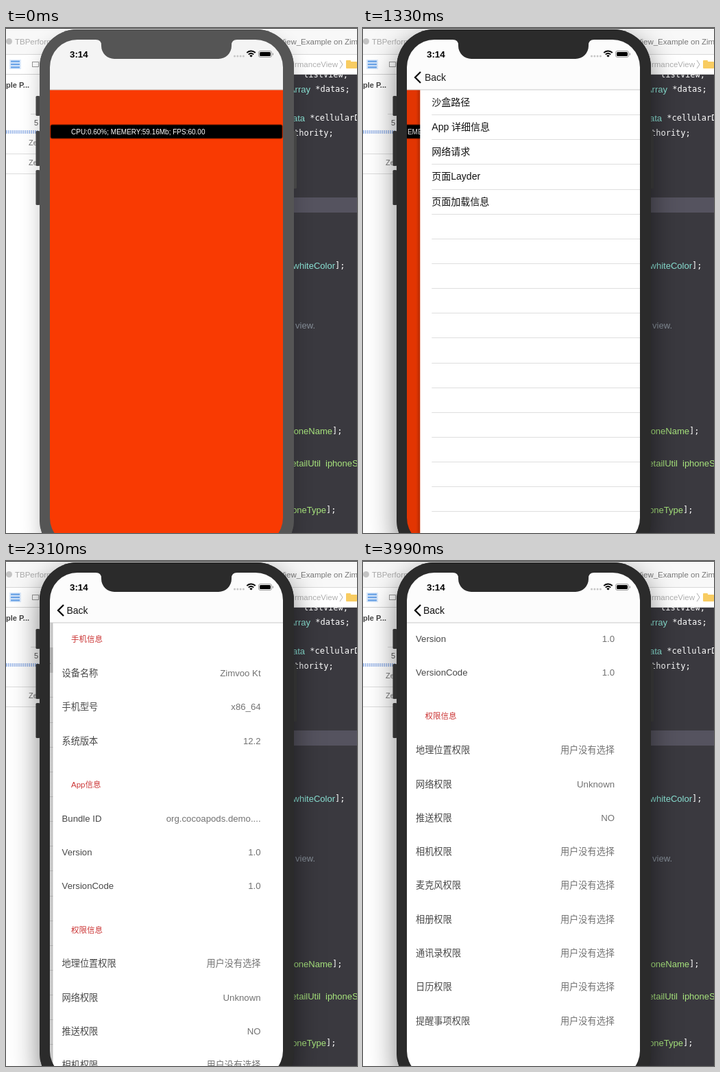
Write an HTML page with a canvas that moves like this. It is 512 px wide and 736 px high and loops after 4060 ms.

```html
<!DOCTYPE html>
<html lang="zh">
<head>
<meta charset="utf-8">
<style>
html, body { margin: 0; width: 100%; height: 100%; overflow: hidden; background: #fff; }
canvas { display: block; }
</style>
</head>
<body>
<canvas id="stage" width="512" height="736"></canvas>
<script>
const c = document.getElementById('stage').getContext('2d');
const SANS = '"Liberation Sans", "Noto Sans CJK SC", "Noto Sans CJK", sans-serif';
const MONO = '"DejaVu Sans Mono", monospace';
const LOOP = 4060, STEP = 70;
const LEFT = 64, TOP = 17, WIDTH = 340, NAV = 90, ROW = 36.14;
const TAP = 1050, PUSH_LIST = 1075, PUSH_INFO = 1960, SCROLL = 2520, SCROLL_END = 3290;

const MENU = ['沙盒路径', 'App 详细信息', '网络请求', '页面Layder', '页面加载信息'];
const ASK = '用户没有选择';
const INFO = [
  ['手机信息', [['设备名称', 'Zimvoo Kt'], ['手机型号', 'x86_64'], ['系统版本', '12.2']]],
  ['App信息', [['Bundle ID', 'org.cocoapods.demo....'], ['Version', '1.0'], ['VersionCode', '1.0']]],
  ['权限信息', [['地理位置权限', ASK], ['网络权限', 'Unknown'], ['推送权限', 'NO'], ['相机权限', ASK],
    ['麦克风权限', ASK], ['相册权限', ASK], ['通讯录权限', ASK], ['日历权限', ASK], ['提醒事项权限', ASK]]]
];

// y is the vertical middle of the glyphs
function text(s, x, y, size, color, { align = 'left', font = SANS, weight = '' } = {}) {
  c.font = `${weight} ${size}px ${font}`;
  c.textAlign = align;
  c.fillStyle = color;
  c.fillText(s, x, y + size * 0.36);
}

function rect(x, y, w, h, color, r = 0) {
  c.fillStyle = color;
  c.beginPath();
  c.roundRect(x, y, w, h, r);
  c.fill();
}

function clipped(x, y, w, h, r, draw) {
  c.save();
  c.beginPath();
  c.roundRect(x, y, w, h, r);
  c.clip();
  draw();
  c.restore();
}

// Share of a spring motion still to go, from 1 to 0
function left(t, start, rate) {
  const x = Math.max(0, t - start) / 1000 * rate;
  const rest = (1 + x) * Math.exp(-x);
  return rest < 0.003 ? 0 : rest;
}

// Coloured word ending at x, plain code following it
function code(word, x, y, color, rest = '') {
  text(word, x, y, 13, color, { align: 'right' });
  text(rest, x, y, 12, '#fff', { font: MONO });
}

function desktop(t) {
  rect(0, 0, 512, 736, '#fff');
  rect(0, 0, 512, 38, '#f8f8f8');
  rect(0, 0, 512, 1, '#333');
  rect(0, 38, 512, 1, '#d8d8d8');
  rect(0, 67, 512, 1, '#d2d2d2');
  rect(0, 15, 9, 9, '#c4c4c4', 4.5);
  text('TBPerformance', 13, 20, 11.5, '#aaa');
  rect(5, 46, 17, 14, '#dceafb');
  for (let i = 0; i < 3; i++) rect(7, 47.5 + i * 4.3, 13, 2.4, '#6da5e8');
  c.strokeStyle = '#999';
  c.strokeRect(38.5, 49.5, 9, 7);
  text('ple P...', 0, 83, 11, '#444', { weight: 'bold' });
  rect(36, 125, 10, 1, '#ddd');
  text('5', 41, 138, 11, '#555');
  for (let x = 0; x < 46; x += 3) rect(x, 149, 2, 5, '#a9c1ec');
  if (t < TAP || t > 2450) text('Zero', 33, 167, 11, '#777');
  text('Zero', 33, 196, 11, '#777');
  for (const y of [183, 212]) rect(0, y, 48, 1, '#ddd');

  text('View_Example on ', 494, 20, 11.5, '#777', { align: 'right' });
  text('Zim', 494, 20, 11.5, '#777');
  text('rmanceView', 484, 53, 11.5, '#b0b0b0', { align: 'right' });
  c.strokeStyle = '#aaa';
  c.beginPath();
  c.moveTo(487, 47); c.lineTo(491, 53); c.lineTo(487, 59);
  c.stroke();
  rect(496, 49, 16, 10, '#f8cc62', 1);
  rect(496, 47, 7, 4, '#f8cc62', 1);

  clipped(400, 68, 112, 668, 0, () => {
    rect(400, 68, 112, 668, '#3a393f');
    rect(400, 247, 112, 22, '#55535f');
    const teal = '#8be3d5', green = '#a8e57d';
    text('listView;', 434, 68, 12, '#fff', { font: MONO });
    code('NSArray', 444, 89, teal, ' *datas;');
    code('Data', 436, 131, teal, ' *cellularData;');
    text('thority;', 420, 153, 12, '#fff', { font: MONO });
    code('whiteColor', 480, 346, teal, '];');
    code('view.', 451, 433, '#87909a');
    code('phoneName', 476, 587, green, '];');
    code('DetailUtil', 459, 634, green);
    text('iphoneSize', 466, 634, 13, green);
    code('phoneType', 467, 702, green, '];');
  });
}

function phoneBody(active) {
  const color = active ? '#2b2b2b' : '#555';
  c.save();
  c.shadowColor = `rgba(0,0,0,${active ? 0.5 : 0.22})`;
  c.shadowBlur = active ? 40 : 28;
  c.shadowOffsetY = 14;
  rect(49, 2, 371, 770, color, 55);
  c.restore();
  for (const [x, y, h] of [[43.5, 99, 29], [43.5, 150, 51], [43.5, 207, 51], [418, 150, 84]])
    rect(x, y, 6, h, active ? '#303030' : '#444', 1.5);
  rect(49, 2, 371, 770, color, 55);
}

// Page sliding in from the right with a thin shadow on its edge
function page(x, rest, draw) {
  if (rest > 0) {
    const g = c.createLinearGradient(x - 6, 0, x, 0);
    g.addColorStop(0, 'rgba(0,0,0,0)');
    g.addColorStop(1, 'rgba(0,0,0,.2)');
    c.fillStyle = g;
    c.fillRect(x - 6, NAV, 6, 660);
  }
  rect(x, NAV, WIDTH, 660, '#fff');
  draw(x);
}

function dim(amount) {
  rect(LEFT, NAV, WIDTH, 660, `rgba(0,0,0,${amount})`);
}

function home(x, t) {
  rect(x, NAV, WIDTH, 660, '#f93a02');
  rect(x + 0.5, 140.5, 339, 21, '#6d1900', 3);
  rect(x + 1.5, 141.5, 337, 19, '#000', 2);
  text(`CPU:0.${t < 500 ? 6 : 4}0%; MEMERY:59.16Mb; FPS:60.00`, x + 31, 151, 10, '#fff');
}

function menu(x, t) {
  for (let i = 1; i < 18; i++) rect(x + 17, Math.round(NAV + i * ROW), WIDTH - 17, 1, '#dedede');
  if (t >= PUSH_INFO) rect(x, 126, WIDTH, 36, '#d9d9d9');
  MENU.forEach((s, i) => text(s, x + 17, 108 + i * ROW, 14, '#111'));
}

function info(x, scroll) {
  let y = 114 - scroll;
  for (const [title, rows] of INFO) {
    text(title, x + 26.5, y, 11.5, '#cb3434');
    for (const [name, value] of rows) {
      y += 49.3;
      text(name, x + 13, y, 13.2, '#484848');
      text(value, x + 303, y, 13.2, '#727272', { align: 'right' });
    }
    y += 63.8;
  }
}

function back(x, alpha) {
  c.globalAlpha = alpha;
  text('Back', x, 72, 14, '#111');
  c.globalAlpha = 1;
}

function navBar(a, b) {
  const shade = Math.round(252 - 8 * a);
  rect(LEFT, TOP, WIDTH, NAV - TOP, `rgb(${shade},${shade},${shade})`);
  rect(LEFT, NAV - 0.5, WIDTH, 1, '#c9c9c9');
  if (a === 1) return;
  c.globalAlpha = 1 - a;
  c.strokeStyle = '#000';
  c.lineWidth = 2.3;
  c.beginPath();
  c.moveTo(84, 64); c.lineTo(76, 72); c.lineTo(84, 80);
  c.stroke();
  c.lineWidth = 1;
  if (b === 1) return back(88 + 35 * a, 1 - a);
  back(88 - 35 * (1 - b), b);
  back(88 + 35 * b, 1 - b);
}

function statusBar(active) {
  c.fillStyle = active ? '#2b2b2b' : '#555';
  c.beginPath();
  c.moveTo(131, 16);
  c.lineTo(131, 17);
  c.quadraticCurveTo(139, 17, 139, 25);
  c.arcTo(139, 45, 159, 45, 19);
  c.arcTo(329, 45, 329, 25, 19);
  c.lineTo(329, 25);
  c.quadraticCurveTo(329, 17, 337, 17);
  c.lineTo(337, 16);
  c.fill();

  text('3:14', 93, 38, 13.3, '#000', { weight: 'bold' });
  for (let i = 0; i < 4; i++) rect(332 + i * 4.3, 39.5, 3, 3, '#c6c6c6', 1.5);
  c.strokeStyle = '#000';
  c.lineWidth = 2;
  for (const r of [8.5, 5]) {
    c.beginPath();
    c.arc(357.5, 42, r, -Math.PI * 0.76, -Math.PI * 0.24);
    c.stroke();
  }
  c.lineWidth = 1;
  c.fillStyle = '#000';
  c.beginPath();
  c.moveTo(357.5, 42.5);
  c.arc(357.5, 42.5, 3, -Math.PI * 0.76, -Math.PI * 0.24);
  c.fill();
  c.strokeStyle = '#999';
  c.beginPath();
  c.roundRect(368.5, 33.5, 19, 9, 2.5);
  c.stroke();
  rect(370, 35, 16, 6, '#000', 1.5);
  rect(388.8, 36.5, 1.2, 3, '#999', 0.6);
}

function draw(t) {
  const active = t >= TAP;
  const a = left(t, PUSH_LIST, 18), b = left(t, PUSH_INFO, 18);
  const scroll = t >= SCROLL_END ? 311.2 : 311.2 * (1 - left(t, SCROLL, 9.4));
  desktop(t);
  phoneBody(active);
  clipped(LEFT, TOP, WIDTH, 737, 40, () => {
    clipped(LEFT, NAV, WIDTH, 664, 0, () => {
      if (a > 0) {
        home(LEFT - 102 * (1 - a), t);
        dim(0.1 * (1 - a));
      }
      if (a < 1 && b > 0) page(LEFT + WIDTH * a - 102 * (1 - b), a, x => menu(x, t));
      if (t >= PUSH_INFO) {
        dim(0.1 * (1 - b));
        page(LEFT + WIDTH * b, b, x => info(x, scroll));
      }
    });
    navBar(a, b);
    statusBar(active);
  });
}

function tick() {
  const t = performance.now() % LOOP;
  draw(Math.floor(t / STEP) * STEP);
  requestAnimationFrame(tick);
}
tick();
</script>
</body>
</html>
```
